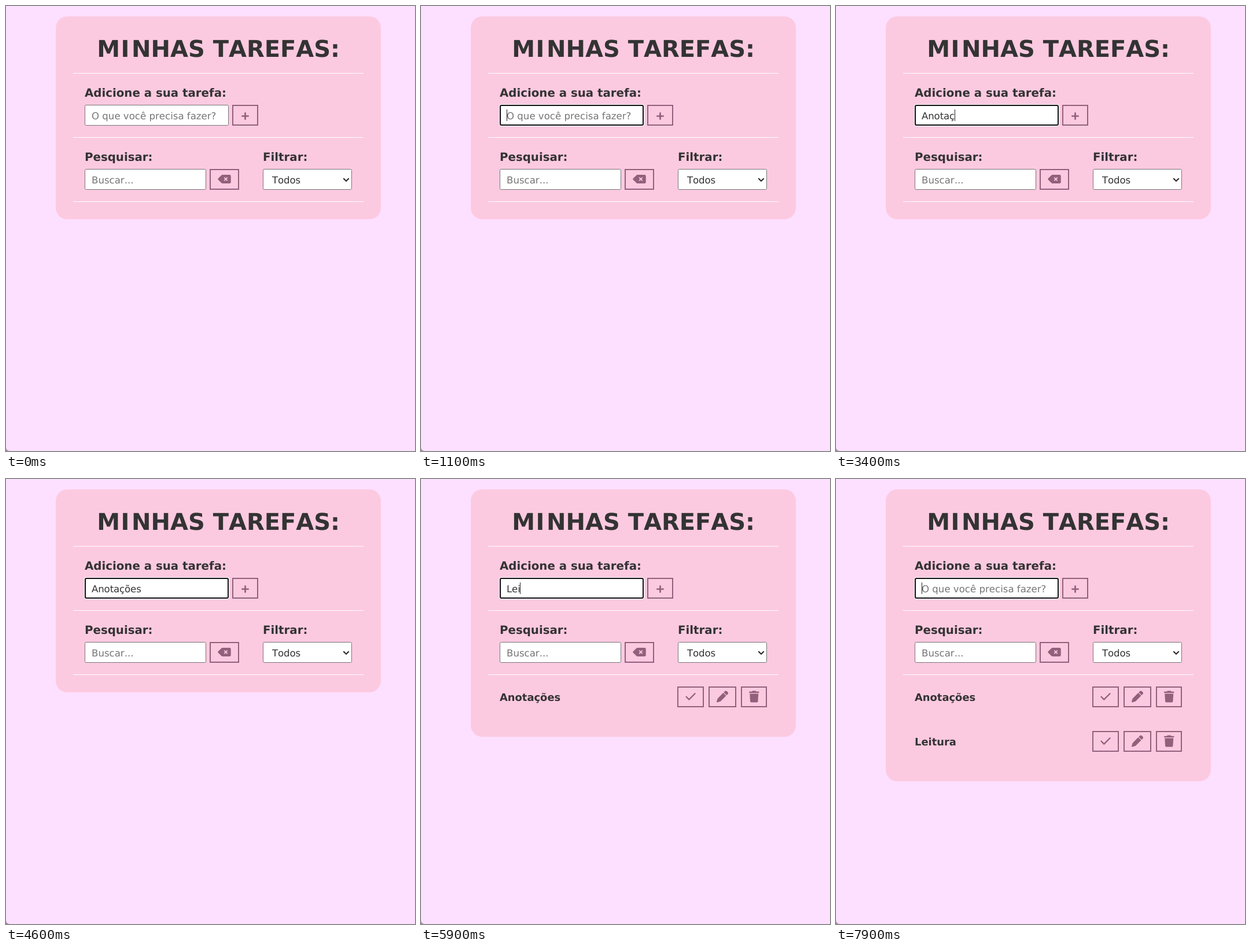
These frames come from a looping animation (707x770 px, 8 s). An HTML page:

```html
<!DOCTYPE html>
<html lang="pt-BR">
<head>
<meta charset="utf-8">
<title>Minhas tarefas</title>
<style>
  html, body { margin: 0; width: 100%; height: 100%; overflow: hidden; background: #fddfff; }
  svg { display: block; }
  text { font: 16.6px "DejaVu Sans", Verdana, sans-serif; font-kerning: none; fill: #333;
         text-rendering: geometricPrecision; white-space: pre; }
  .title { font-size: 40px; font-weight: bold; }
  .label { font-size: 19.8px; font-weight: bold; }
  .task { font-size: 17.9px; font-weight: bold; }
  .typed { letter-spacing: -.13px; }
  .hint { fill: #757575; }
  .field { fill: #fff; stroke: #767676; }
  .button { fill: none; stroke: #92607b; stroke-width: 2; }
  .solid { fill: #92607b; }
  .line { fill: none; stroke: #92607b; stroke-linecap: round; stroke-linejoin: round; }
</style>
</head>
<body>
<svg width="707" height="770" viewBox="0 0 707 770">
  <defs>
    <g id="actions">
      <rect class="button" x="444" y="360" width="44" height="34"/>
      <rect class="button" x="498" y="360" width="46" height="34"/>
      <rect class="button" x="554" y="360" width="43" height="34"/>
      <path class="line" stroke-width="2.3" d="M458.5 376.8l4.8 4.8 10.3-10.3"/>
      <g class="solid">
        <path transform="translate(511 366.5) scale(.0391)" d="M363 19L314 68 444 198l49-49c25-25 25-65 0-90L453 19c-25-25-65-25-90 0zM292 90L59 323c-11 10-18 23-22 37L1 481c-5 18 11 35 30 30l120-36c14-4 27-12 37-22L422 220z"/>
        <path transform="translate(567 366.5) scale(.0391)" d="M135 18L128 32H32a32 32 0 0 0 0 64H416a32 32 0 0 0 0-64H320l-7-14Q304 0 284 0H164Q144 0 135 18zM416 128H32L53 467q4 45 48 45H347q44 0 48-45z"/>
      </g>
    </g>
  </defs>

  <rect width="707" height="770" fill="#fddfff"/>
  <path d="M0 763Q0 770 7 770H0z" fill="#a08ca2"/>
  <rect id="card" x="86" y="18" width="562" height="351" rx="20" fill="#fccae0"/>
  <path d="M116 116.5h502M116 227.5h502M116 338.5h502" stroke="#fff"/>

  <text class="title" x="157.2" y="88" dx="0 1.6 3.5">MINHAS TAREFAS:</text>
  <text class="label" x="136" y="157">Adicione a sua tarefa:</text>
  <text class="label" x="136" y="268">Pesquisar:</text>
  <text class="label" x="444" y="268">Filtrar:</text>

  <rect id="input" class="field" x="136.5" y="171.5" width="248" height="35" rx="2"/>
  <g id="focus">
    <rect x="135" y="170" width="251" height="38" rx="4" fill="#fff"/>
    <rect x="137" y="172" width="247" height="34" rx="2" fill="#fff" stroke="#101010" stroke-width="2"/>
  </g>
  <text id="hint" class="hint" x="148" y="196">O que você precisa fazer?</text>
  <text id="typed" class="typed" x="148" y="196"></text>
  <rect id="caret" y="179" width="1" height="20" fill="#222"/>
  <rect class="button" x="392" y="172" width="43" height="34"/>
  <path class="line" stroke-width="2.7" d="M408.3 190.5h10.4M413.5 185.3v10.4"/>

  <rect class="field" x="136.5" y="282.5" width="209" height="35" rx="2"/>
  <text class="hint" x="148" y="307">Buscar...</text>
  <rect class="button" x="353" y="283" width="49" height="34"/>
  <g transform="translate(366.2 289.5) scale(.0391)">
    <path class="solid" d="M576 128q0-64-64-64H205q-26 0-45 19L9 233q-18 23 0 46L160 429q19 19 45 19H512q64 0 64-64z"/>
    <path d="M296 200l112 112M408 200L296 312" stroke="#fccae0" stroke-width="48" stroke-linecap="round"/>
  </g>

  <rect class="field" x="444.5" y="282.5" width="153" height="35" rx="2"/>
  <text class="typed" x="460" y="307">Todos</text>
  <path d="M583.3 298.2l4.7 4.7 4.7-4.7" fill="none" stroke="#222" stroke-width="2"/>

  <g id="row1">
    <text class="task" x="136" y="384">Anotações</text>
    <use href="#actions"/>
  </g>
  <g id="row2">
    <text class="task" x="136" y="461">Leitura</text>
    <use href="#actions" y="77"/>
  </g>
</svg>
<script>
  const LOOP = 8000, TEXT_X = 148, FOCUS = 1100, ADDED = [4700, 7900];
  const $ = id => document.getElementById(id);
  const show = (id, on) => $(id).setAttribute('visibility', on ? 'visible' : 'hidden');

  // Moments at which one more letter appears
  const words = [
    ['Anotações', [1900, 2400, 2500, 2800, 2900, 3400, 3700, 3800, 4100]],
    ['Leitura', [5300, 5800, 5900, 6200, 6300, 6400, 7000]]
  ];
  const caretOff = [[0, FOCUS], [1500, 1900], [4600, 5100], [6900, 7000], [7500, 7900]];
  const hovers = [[400, 500], [800, FOCUS]];
  const within = (spans, t) => spans.some(([from, to]) => t >= from && t < to);

  function draw(t) {
    const rows = ADDED.filter(a => t >= a).length;
    const [word, keys] = words[rows] || ['', []];
    const typed = word.slice(0, keys.filter(k => t >= k).length);

    $('typed').textContent = typed;
    show('hint', !typed);
    show('focus', t >= FOCUS);
    show('caret', !within(caretOff, t));
    const width = typed ? $('typed').getComputedTextLength() : 0;
    $('caret').setAttribute('x', Math.floor(TEXT_X + width));

    $('input').style.stroke = within(hovers, t) ? '#4f4f4f' : '#767676';
    $('card').setAttribute('height', 351 + 77 * rows);
    show('row1', rows > 0);
    show('row2', rows > 1);
  }

  const start = performance.now();
  function tick() {
    draw((performance.now() - start) % LOOP);
    requestAnimationFrame(tick);
  }
  tick();
</script>
</body>
</html>
```
